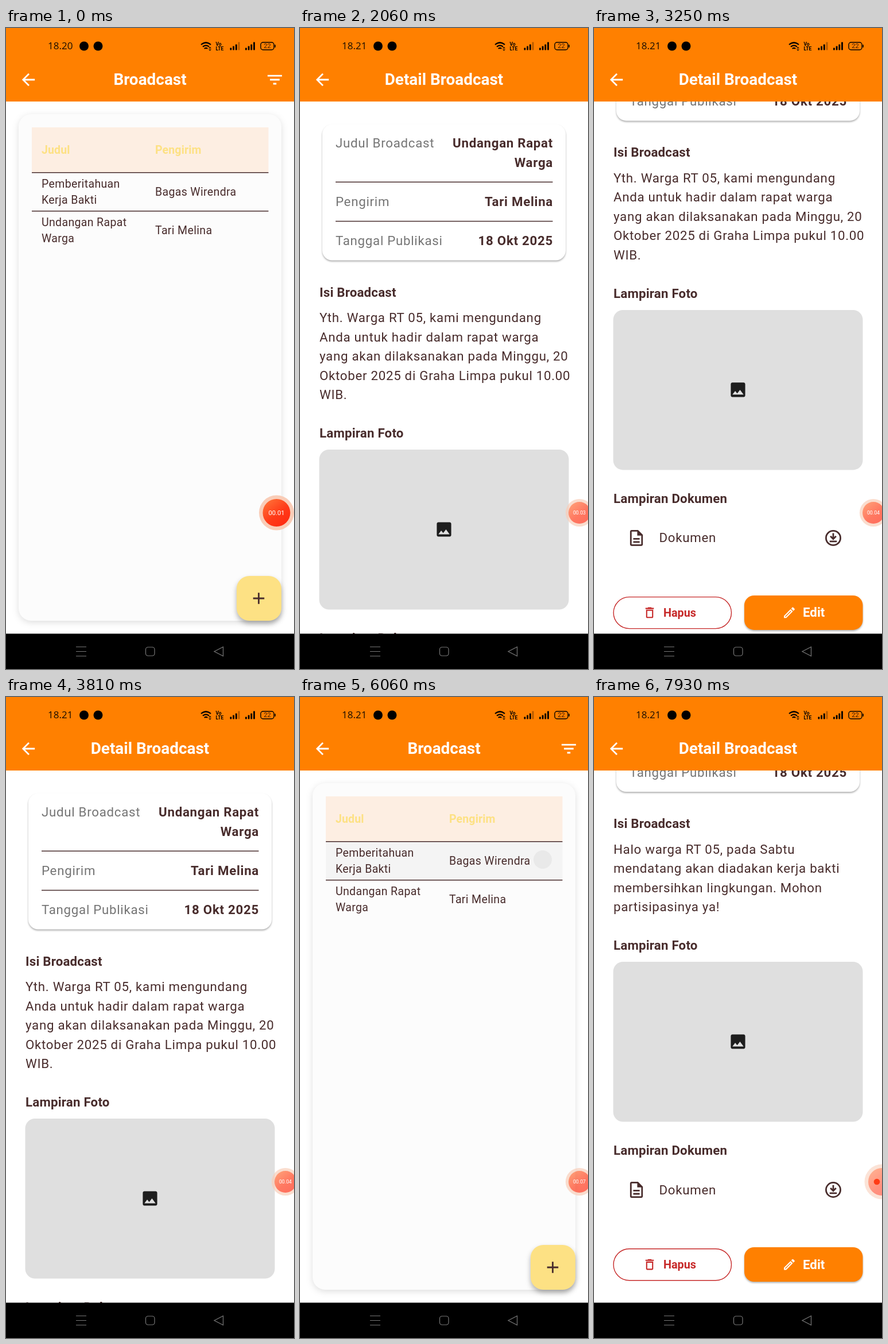
Write an HTML page that moves like this. It is 502x1116 px and loops after 8000 ms.

```html
<!DOCTYPE html>
<html lang="id">
<head>
<meta charset="utf-8">
<title>Broadcast</title>
<style>
html, body { margin: 0; width: 100%; height: 100%; overflow: hidden; background: #fff; }
svg { display: block; width: 100%; height: 100%; font-family: Roboto, sans-serif; fill: #482c2c; }
.b { font-weight: 700; }
.bar { font-size: 27.9px; font-weight: 700; fill: #fff; text-anchor: middle; }
.cell { font-size: 19.5px; letter-spacing: .35px; }
.head { font-size: 19.5px; letter-spacing: .14px; font-weight: 700; fill: #fde184; }
.body { font-size: 22.3px; letter-spacing: .7px; }
.sec { font-size: 22.3px; letter-spacing: .2px; font-weight: 700; }
.grey { fill: #757575; }
.end { text-anchor: end; }
.line { stroke: #482c2c; stroke-width: 1.5; }
</style>
</head>
<body>
<svg id="stage" viewBox="0 0 502 1116"></svg>
<script>
const ICON = {
  back: 'M20 11H7.83l5.59-5.59L12 4l-8 8 8 8 1.41-1.41L7.83 13H20v-2z',
  filter: 'M10 18h4v-2h-4v2zM3 6v2h18V6H3zm3 7h12v-2H6v2z',
  add: 'M19 13h-6v6h-2v-6H5v-2h6V5h2v6h6v2z',
  image: 'M21 19V5c0-1.1-.9-2-2-2H5c-1.1 0-2 .9-2 2v14c0 1.1.9 2 2 2h14c1.1 0 2-.9 2-2zM8.5 13.5l2.5 3.01L14.5 12l4.5 6H5l3.5-4.5z',
  doc: 'M8 16h8v2H8zm0-4h8v2H8zm6-10H6c-1.1 0-2 .9-2 2v16c0 1.1.89 2 1.99 2H18c1.1 0 2-.9 2-2V8l-6-6zm4 18H6V4h7v5h5v11z',
  bin: 'M6 19c0 1.1.9 2 2 2h8c1.1 0 2-.9 2-2V7H6v12zM8 9h8v10H8V9zm7.5-5l-1-1h-5l-1 1H5v2h14V4z',
  pen: 'M14.06 9.02l.92.92L5.92 19H5v-.92l9.06-9.06M17.66 3c-.25 0-.51.1-.7.29l-1.83 1.83 3.75 3.75 1.83-1.83c.39-.39.39-1.02 0-1.41l-2.34-2.34c-.2-.2-.45-.29-.71-.29zm-3.6 3.19L3 17.25V21h3.75L17.81 9.94l-3.75-3.75z'
};
const text = (x, y, s, cls, attr = '') => `<text x="${x}" y="${y}" class="${cls}" ${attr}>${s}</text>`;
const rect = (x, y, w, h, r, fill, attr = '') =>
  `<rect x="${x}" y="${y}" width="${w}" height="${h}" rx="${r}" fill="${fill}" ${attr}/>`;
const rule = (x1, x2, y) => `<path class="line" d="M${x1} ${y}H${x2}"/>`;
const place = (cx, cy, size) => `transform="translate(${cx} ${cy}) scale(${size / 24}) translate(-12 -12)"`;
const icon = (name, cx, cy, size = 33.5, fill = '#482c2c') =>
  `<path d="${ICON[name]}" fill="${fill}" ${place(cx, cy, size)}/>`;
const shadow = (y, blur, a) => `style="filter:drop-shadow(0 ${y}px ${blur}px rgba(0,0,0,${a}))"`;
const appBar = title => rect(0, 0, 502, 128, 0, '#ff8000') +
  icon('back', 39, 90, 33.5, '#fff') + text(251, 99, title, 'bar');

const people = ['Bagas Wirendra', 'Tari Melina'];
const titles = [['Pemberitahuan', 'Kerja Bakti'], ['Undangan Rapat', 'Warga']];

const listPage = () => rect(0, 0, 502, 1116, 0, '#fff') +
  rect(22, 150, 458, 882, 22, '#fcfcfc', shadow(3, 6, .13)) +
  rect(45, 173, 412.5, 78, 0, '#fdeee2') +
  text(62, 219, 'Judul', 'head') + text(260, 219, 'Pengirim', 'head') +
  `<g id="touch">${rect(45, 252, 412.5, 66.5, 0, '#f4f4f4')}<circle id="tip" r="16" cy="283" fill="#e9e9e9"/></g>` +
  rule(45, 457.5, 251.7) + rule(45, 457.5, 318.8) +
  people.map((p, i) => text(62, 278 + 67 * i, titles[i][0], 'cell') +
    text(62, 306 + 67 * i, titles[i][1], 'cell') + text(260, 292 + 67 * i, p, 'cell')).join('') +
  rect(402, 954, 78, 78, 22, '#fde184', shadow(5, 4, .3)) + icon('add', 440.5, 993) +
  appBar('Broadcast') + icon('filter', 468.5, 90, 33.5, '#fff');

function detailPage(i, lines) {
  const d = (lines.length - 5) * 33.5;
  const row = (y, label, value) => text(62, y, label, 'body grey') + text(441, y, value, 'body b end');
  return rect(0, 0, 502, 1116, 0, '#fff') + `<g class="scroll">` +
    rect(39, 168, 424, 236.5, 17, '#fff', shadow(2, 1.8, .32)) +
    row(208, 'Judul Broadcast', titles[i][0]) + text(441, 241.5, titles[i][1], 'body b end') +
    rule(62, 440.5, 268.3) + row(310, 'Pengirim', people[i]) +
    rule(62, 440.5, 336.6) + row(378, 'Tanggal Publikasi', '18 Okt 2025') +
    text(34, 467.5, 'Isi Broadcast', 'sec') +
    lines.map((s, k) => text(34, 512 + 33.5 * k, s, 'body')).join('') +
    `<g transform="translate(0 ${d})">` +
    text(34, 713, 'Lampiran Foto', 'sec') +
    rect(33.5, 734, 435, 278.5, 17, '#dfdfdf') + icon('image', 251, 873, 33.5, '#1d1d1d') +
    text(34, 1070, 'Lampiran Dokumen', 'sec') +
    icon('doc', 74, 1131) + text(113.5, 1138.5, 'Dokumen', 'body') +
    `<g fill="none" stroke="#482c2c" stroke-width="2" ${place(417, 1131, 33.5)}>
      <circle cx="12" cy="12" r="9"/><path d="M12 6v7M8.5 9.8l3.5 3.5 3.5-3.5M7.5 16.2h9"/></g>` +
    rect(34, 1233.7, 205.5, 55, 27.5, '#fff', 'stroke="#c62828" stroke-width="1.4"') +
    icon('bin', 97, 1261, 25, '#c62828') +
    text(121, 1268, 'Hapus', 'b', 'font-size="19.8" fill="#c62828"') +
    rect(262, 1231, 206.5, 60, 17, '#ff8000', shadow(2, 1.8, .3)) +
    icon('pen', 340.5, 1261, 25, '#fff') +
    text(364, 1268.5, 'Edit', 'b', 'font-size="22.3" fill="#fff"') +
    '</g></g>' + appBar('Detail Broadcast');
}

const signal = (x, faded) => [4, 7, 10, 14].map((h, i) =>
  rect(x + i * 4.7, 38.5 - h, 2.8, h, .8, '#000', i == 3 && faded ? 'opacity=".3"' : '')).join('');

const system = () => text(73, 37.3, '18.20', '', 'id="clock" font-size="17" fill="#1a0d00" style="font-family:Open Sans,Noto Sans,sans-serif"') +
  '<circle cx="136" cy="31.5" r="8"/><circle cx="160.5" cy="31.5" r="8"/>'.replace(/\/>/g, ' fill="#000"/>') +
  `<g fill="none" stroke="#000" stroke-width="2.2"><path d="M340 29q8.5-7 17 0M343 32.6q5.500-4.600 11 0M345.800 36q2.700-2.200 5.400 0"/>
    <path stroke-width="1.2" d="M353.800 35.500l1.700-1.700 1.700 1.700M353.800 37.200l1.700 1.700 1.700-1.700"/></g>` +
  text(365.5, 30.8, 'Vo', 'b', 'font-size="8.5" fill="#000"') +
  text(365.5, 38.8, 'LTE', 'b', 'font-size="8.5" fill="#000"') +
  signal(390.5, true) + signal(417, false) +
  rect(444, 25, 23, 13, 4, 'none', 'stroke="#000" stroke-width="1.4"') +
  rect(468.3, 29, 1.6, 5, .8, '#000') +
  text(455.5, 35.4, '22', '', 'font-size="11" fill="#401c00" text-anchor="middle"') +
  rect(0, 1054.500, 502, 62, 0, '#000') +
  `<g fill="none" stroke="#777" stroke-width="1.2">
    <path d="M122 1077.500h18M122 1085.500h18M122 1093.500h18M363 1085.500l15.500-8v16z"/>
    <rect x="243.500" y="1078" width="15.500" height="15" rx="4"/></g>`;

const recorder = () => `<g id="rec"><circle r="30.5" fill="#f9cdb8"/><circle r="24" fill="url(#red)"/>` +
  text(0, 4, '', '', 'id="count" font-size="11.2" fill="#fff" text-anchor="middle"') + '</g>' +
  '<circle id="dot" cx="493" cy="844" r="5.300" fill="#ff3c16"/>';

const $ = id => document.getElementById(id);
$('stage').innerHTML = `<defs><linearGradient id="red" x1="0" y1="0" x2=".8" y2="1">
  <stop offset="0" stop-color="#ff7a3c"/><stop offset=".6" stop-color="#ff3a18"/><stop offset="1" stop-color="#ff2a12"/></linearGradient></defs>
  <g id="list">${listPage()}</g>
  <g id="invite">${detailPage(1, ['Yth. Warga RT 05, kami mengundang', 'Anda untuk hadir dalam rapat warga',
    'yang akan dilaksanakan pada Minggu, 20', 'Oktober 2025 di Graha Limpa pukul 10.00', 'WIB.'])}</g>
  <g id="notice">${detailPage(0, ['Halo warga RT 05, pada Sabtu', 'mendatang akan diadakan kerja bakti',
    'membersihkan lingkungan. Mohon', 'partisipasinya ya!'])}</g>` + system() + recorder();

const prog = (t, a, b) => Math.min(1, Math.max(0, (t - a) / (b - a)));
const glide = u => u < .5 ? Math.pow(2 * u, 2.25) / 2 : 1 - Math.pow(2 - 2 * u, 2.25) / 2;
const out = u => 1 - Math.pow(1 - u, 3);
const zoom = k => `translate(251 558) scale(${k}) translate(-251 -558)`;
const show = (el, on) => el.style.display = on ? '' : 'none';

// Page zooms and fades in over the list; returns how far it has come.
function push(id, t, start, end) {
  const u = prog(t, start, end), e = out(u);
  show($(id), u > 0);
  $(id).setAttribute('transform', zoom(.85 + .15 * e));
  $(id).setAttribute('opacity', prog(u, .05, .35));
  return e;
}
function scroll(id, y, stretch) {
  document.querySelector(`#${id} .scroll`).setAttribute('transform',
    `translate(0 ${128 - y}) scale(1 ${1 + stretch}) translate(0 -128)`);
}

function draw(t) {
  let depth = push('invite', t, 940, 1250);
  const pop = prog(t, 5430, 5560);
  if (pop > 0) {
    show($('invite'), pop < 1);
    $('invite').setAttribute('transform', zoom(1 - .1 * pop));
    $('invite').setAttribute('opacity', 1 - pop);
    depth = 1 - pop;
  }
  depth = Math.max(depth, push('notice', t, 6190, 6560));
  $('list').setAttribute('transform', zoom(1 + .05 * depth));

  scroll('invite', 273 * (glide(prog(t, 2250, 3000)) - glide(prog(t, 3060, 3810))),
    .004 * Math.sin(Math.PI * prog(t, 4310, 4490)));
  scroll('notice', 239.5 * glide(prog(t, 7480, 7930)),
    .006 * (out(prog(t, 7180, 7430)) - prog(t, 7430, 7560)));

  const first = t >= 870 && t < 1250, second = t >= 6060 && t < 6560;
  show($('touch'), first || second);
  $('touch').setAttribute('transform', `translate(0 ${first ? 67.500 : 0})`);
  $('tip').setAttribute('cx', first ? 330 : 423);

  const docked = t >= 370, hidden = t >= 7180;
  $('clock').textContent = t < 120 ? '18.20' : '18.21';
  $('count').textContent = hidden ? '' : '00.0' + (1 + Math.floor(Math.max(0, t + 950) / 1000) - (t >= 50 ? 1 : 0) + (t < 50 ? 0 : 1) - (t >= 50 ? 1 : 0));
  $('rec').setAttribute('transform', `translate(${hidden ? 502 : docked ? 487 : 471.5} 844) scale(${docked && !hidden ? .79 : 1})`);
  $('rec').setAttribute('opacity', hidden ? .55 : docked ? .68 : 1);
  show($('dot'), hidden);
}

function frame() {
  draw(performance.now() % 8000);
  requestAnimationFrame(frame);
}
frame();
</script>
</body>
</html>
```
